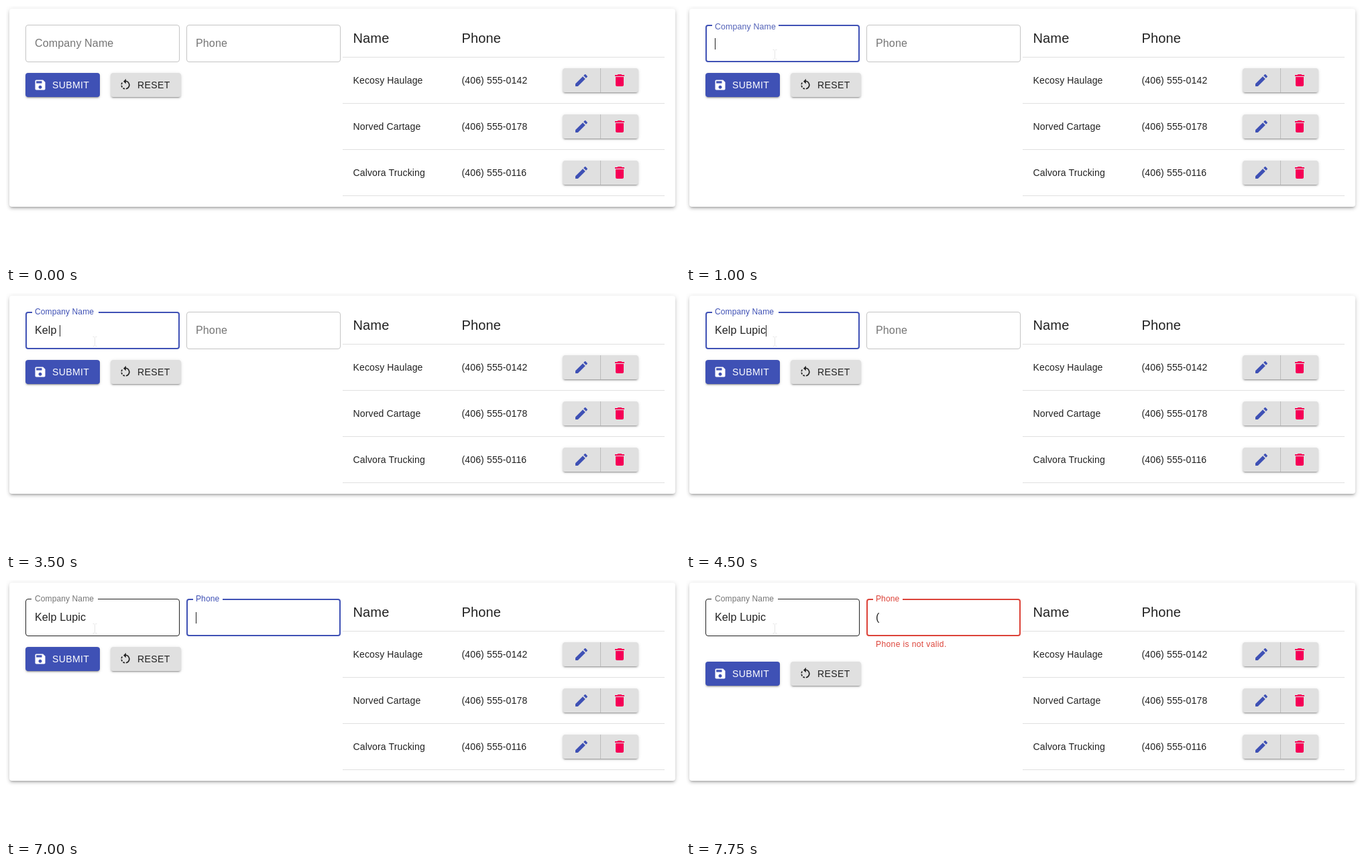
Write an HTML page that moves like this. It is 1005 px wide and 387 px high and loops after 8 s.

```html
<!DOCTYPE html>
<html lang="en">
<head>
<meta charset="utf-8">
<title>Contact form</title>
<style>
html, body { margin: 0; width: 100%; height: 100%; overflow: hidden; background: #fff; }
body { position: relative; font-family: "Liberation Sans", Arial, sans-serif; color: #212121; }
div, #art { position: absolute; }
#card {
  left: 5px; top: 4px; width: 993px; height: 296px; border-radius: 4px; background: #fff;
  box-shadow: 0 3px 3px -2px rgba(0,0,0,.2), 0 3px 4px rgba(0,0,0,.14), 0 1px 8px rgba(0,0,0,.12);
}
.btn {
  height: 36px; border-radius: 4px; background: #e0e0e0;
  font-size: 14px; line-height: 36px; letter-spacing: .02857em; white-space: nowrap;
  box-shadow: 0 3px 1px -2px rgba(0,0,0,.2), 0 2px 2px rgba(0,0,0,.14), 0 1px 5px rgba(0,0,0,.12);
}
.btn span { position: absolute; left: 40px; }
.btn svg { position: absolute; fill: currentColor; }
#submit { left: 29px; width: 111px; background: #3f51b5; color: #fff; }
#reset { left: 156px; width: 105px; }
.pair { left: 830px; width: 113px; }
.pair i { position: absolute; left: 56px; width: 1px; height: 36px; background: #bdbdbd; }
#art { left: 0; top: 0; width: 1005px; height: 387px; }
#art text { white-space: pre; fill: #212121; font-size: 16px; letter-spacing: .00938em; }
#art .cell { font-size: 14px; letter-spacing: .01071em; }
#art .head { font-size: 20px; letter-spacing: .0075em; }
#art #help { font-size: 12px; letter-spacing: .03333em; fill: #dc4238; }
</style>
</head>
<body>
<div id="card"></div>
<div id="actions">
  <div class="btn" id="submit"><span>SUBMIT</span></div>
  <div class="btn" id="reset"><span>RESET</span></div>
</div>
<svg id="art" viewBox="0 0 1005 387">
  <g id="table"></g>
  <g id="fields" fill="none"></g>
  <text id="help" x="283" y="100">Phone is not valid.</text>
  <rect id="caret" y="48" width="1" height="17" fill="#212121"/>
  <path id="beam" d="M129.500 65.500h2l1 1 1-1h2M132.500 66.500v12M129.500 79.500h2l1-1 1 1h2" fill="none" stroke="#e6e6e6"/>
  <path id="arrow" d="M.5.5v16l3.800-3.500 2.500 5.500 2.200-1L6.600 12h4.900z" fill="#fff" stroke="#000"/>
</svg>
<script>
const LOOP = 8000;
const BLUE = "#3f51b5", RED = "#dc4238", DARK = "#212121", LINE = "#c4c4c4", GREY = "#757575";
const NS = "http://www.w3.org/2000/svg";
const $ = id => document.getElementById(id);

const ICONS = {
  save: "M17 3H5c-1.11 0-2 .9-2 2v14c0 1.1.89 2 2 2h14c1.1 0 2-.9 2-2V7l-4-4zm-5 16c-1.66 0-3-1.34-3-3s1.34-3 3-3 3 1.34 3 3-1.34 3-3 3zm3-10H5V5h10v4z",
  undo: "M7.11 8.53L5.7 7.11C4.8 8.27 4.24 9.61 4.07 11h2.02c.14-.87.49-1.72 1.02-2.47zM6.09 13H4.07c.17 1.39.72 2.73 1.62 3.89l1.41-1.42c-.52-.75-.87-1.59-1.01-2.47zm1.01 5.32c1.16.9 2.51 1.44 3.9 1.61V17.9c-.87-.15-1.71-.49-2.46-1.03L7.1 18.32zM13 4.07V1L8.45 5.55 13 10V6.09c2.84.48 5 2.94 5 5.91s-2.16 5.43-5 5.91v2.02c3.95-.49 7-3.85 7-7.93s-3.05-7.44-7-7.93z",
  edit: "M3 17.25V21h3.75L17.81 9.94l-3.75-3.75L3 17.25zM20.71 7.04c.39-.39.39-1.02 0-1.41l-2.34-2.34c-.39-.39-1.02-.39-1.41 0l-1.83 1.83 3.75 3.75 1.83-1.83z",
  trash: "M6 19c0 1.1.9 2 2 2h8c1.1 0 2-.9 2-2V7H6v12zM19 4h-3.5l-1-1h-5l-1 1H5v2h14V4z"
};

function make(tag, attrs, parent, text = "") {
  const el = document.createElementNS(NS, tag);
  set(el, attrs);
  el.textContent = text;
  return parent.appendChild(el);
}
function set(el, attrs) {
  for (const k in attrs) el.setAttribute(k, attrs[k]);
}
function icon(parent, name, x, y, size, color = "") {
  const svg = make("svg", { viewBox: "0 0 24 24", width: size, height: size }, parent);
  svg.style.cssText = `left:${x}px;top:${y}px;color:${color}`;
  make("path", { d: ICONS[name] }, svg);
}

icon($("submit"), "save", 12, 8, 20);
icon($("reset"), "undo", 12, 8, 20);

function tableRow(cls, base, line, cells) {
  cells.forEach((s, i) => make("text", { class: cls, x: i ? 679.5 : 517.5, y: base }, $("table"), s));
  make("rect", { x: 502, y: line, width: 480, height: 1, fill: "#e0e0e0" }, $("table"));
}
tableRow("head", 55, 76, ["Name", "Phone"]);
[
  ["Kecosy Haulage", "(406) 555-0142"],
  ["Norved Cartage", "(406) 555-0178"],
  ["Calvora Trucking", "(406) 555-0116"]
].forEach((cells, i) => {
  const y = 93 + 69 * i;
  tableRow("cell", y + 23, y + 52, cells);
  const pair = document.createElement("div");
  pair.className = "btn pair";
  pair.style.top = y + "px";
  pair.append(document.createElement("i"));
  icon(pair, "edit", 16, 6, 24, BLUE);
  icon(pair, "trash", 73, 6, 24, "#f50057");
  $("art").before(pair);
});

function makeField(x, label, gap) {
  const box = $("fields");
  return {
    x, gap,
    frame: make("path", {}, box),
    label: make("text", { x: x + 14 }, box, label),
    value: make("text", { x: x + 14, y: 61 }, box)
  };
}
const company = makeField(29, "Company Name", 99);
const phone = makeField(269, "Phone", 44);

// Outline with a notch in its top edge; lift runs from 0 (resting label) to 1 (raised).
function drawField(f, { lift = 0, width = 1, border = LINE, color = GREY, text = "" }) {
  const h = width / 2, r = 4 - h, l = f.x + h, e = f.x + 230 - h, t = 28 + h, b = 84 - h;
  const from = lift ? f.x + 9 + (width - 1) + f.gap : l + r;
  const to = lift ? f.x + 9 + (width - 1) : l + r;
  const arc = (dx, dy) => `a${r} ${r} 0 0 1 ${dx} ${dy}`;
  set(f.frame, {
    d: `M${from} ${t}H${e - r}${arc(r, r)}V${b - r}${arc(-r, r)}H${l + r}${arc(-r, -r)}V${t + r}${arc(r, -r)}H${to}`,
    stroke: border, "stroke-width": width
  });
  const scale = 1 - .25 * lift;
  set(f.label, { y: 48 - 26 * lift + 13 * scale });
  f.label.style.fontSize = 16 * scale + "px";
  f.label.style.fill = color;
  f.label.style.visibility = text && !lift ? "hidden" : "";
  if (f.value.textContent !== text) f.value.textContent = text;
}

const at = (steps, t) => steps.filter(s => s[0] <= t).pop()[1];

const NAME = "Kelp Lupic";
const typed = [[0, 0], [2000, 1], [2250, 2], [3000, 4], [3500, 5], [3750, 7], [4000, 8], [4500, 10]];
const caretOn = [[0, 0], [1000, 1], [1500, 0], [2000, 1], [2750, 0], [3000, 1],
  [5500, 0], [6000, 1], [6500, 0], [7000, 1], [7750, 0]];
const pointer = [[0, null], [250, [301, 190]], [500, [127, 80]], [750, null]];

function companyState(t) {
  const text = NAME.slice(0, at(typed, t));
  if (t < 750) return {};
  if (t < 1000) return { border: DARK };
  if (t < 1250) return { lift: .9, width: 2, border: BLUE, color: "#5362b8" };
  if (t < 5000) return { lift: 1, width: 2, border: BLUE, color: BLUE, text };
  return { lift: 1, border: DARK, text };
}
function phoneState(t) {
  if (t < 5000) return {};
  if (t < 5250) return { lift: .94, width: 2, border: BLUE, color: "#4b5ab6" };
  if (t < 7250) return { lift: 1, width: 2, border: BLUE, color: BLUE };
  return { lift: 1, width: 2, border: RED, color: RED, text: "(" };
}

function draw(t) {
  drawField(company, companyState(t));
  drawField(phone, phoneState(t));

  const invalid = t >= 7250;
  $("help").style.display = invalid ? "" : "none";
  $("actions").style.top = (invalid ? 122 : 100) + "px";

  const active = t < 5000 ? company : phone;
  const end = active.value.textContent ? active.value.getComputedTextLength() : 0;
  set($("caret"), { x: Math.floor(active.x + 14 + end), opacity: at(caretOn, t) });

  const tip = at(pointer, t);
  $("arrow").style.display = tip ? "" : "none";
  if (tip) set($("arrow"), { transform: `translate(${tip})` });
  $("beam").style.display = t >= 750 ? "" : "none";
}

function tick() {
  draw(performance.now() % LOOP);
  requestAnimationFrame(tick);
}
tick();
</script>
</body>
</html>
```
